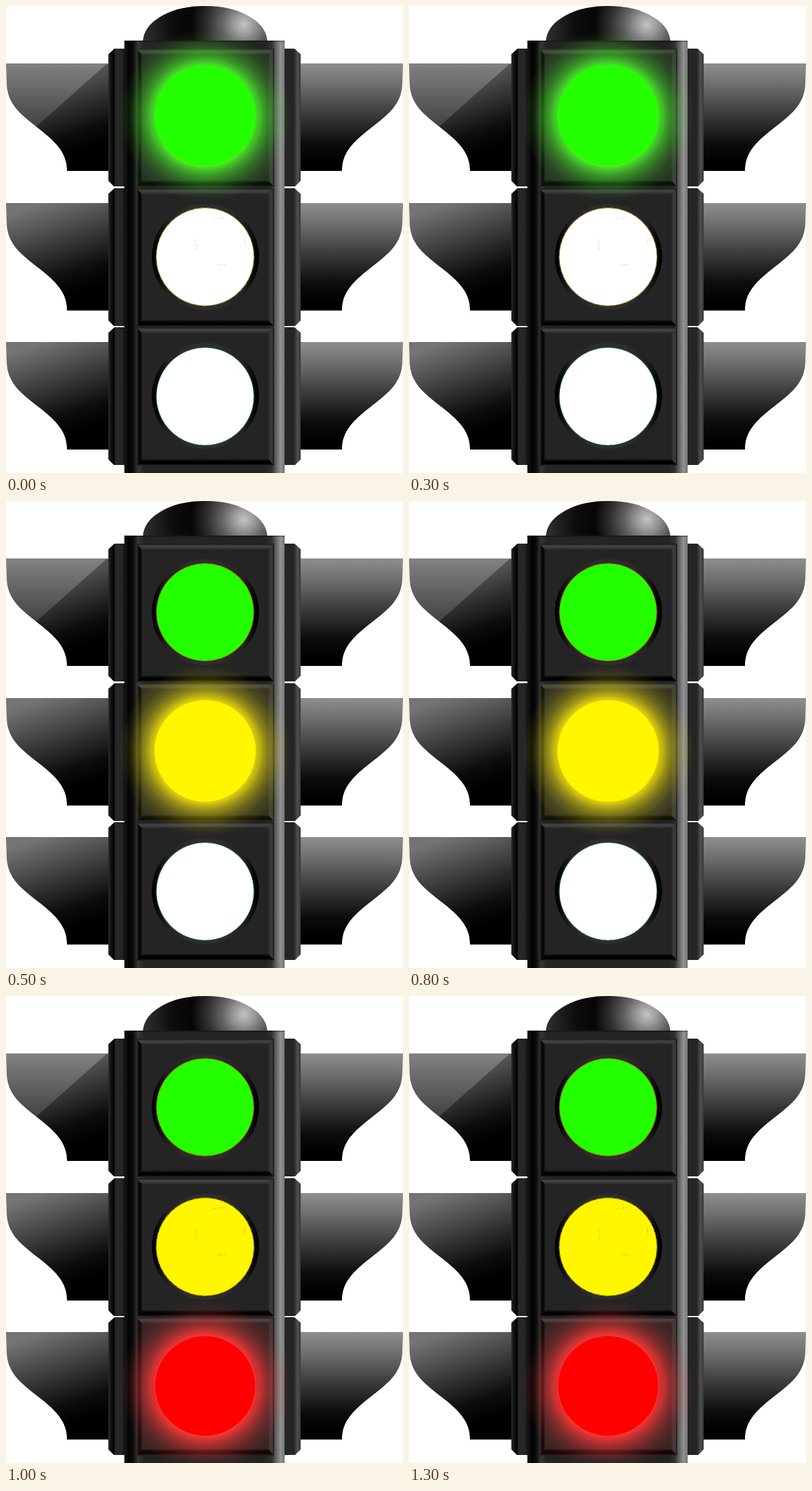
Recreate the animation shown at these times as an HTML page. Size 644 px wide and 756 px high, loop 1500 ms.

```html
<!DOCTYPE html>
<html lang="en">
<head>
<meta charset="utf-8">
<title>Traffic light</title>
<style>
  html, body { margin: 0; width: 100%; height: 100%; overflow: hidden; background: #fff; }
  svg { display: block; }
</style>
</head>
<body>
<svg id="stage" width="644" height="756" viewBox="0 0 644 756"></svg>
<script>
const NS = 'http://www.w3.org/2000/svg';
const LOOP = 1500;
const stage = document.getElementById('stage');

function el(parent, tag, attrs) {
  const node = document.createElementNS(NS, tag);
  for (const key in attrs) node.setAttribute(key, attrs[key]);
  parent.appendChild(node);
  return node;
}

const defs = el(stage, 'defs', {});

// stops: [offset, colour, opacity]
function gradient(id, kind, attrs, stops) {
  const g = el(defs, kind + 'Gradient', { id, gradientUnits: 'userSpaceOnUse', ...attrs });
  for (const [offset, color, opacity = 1] of stops)
    el(g, 'stop', { offset, 'stop-color': color, 'stop-opacity': opacity });
}
const across = (id, x1, x2, stops) => gradient(id, 'linear', { x1, x2, y1: 0, y2: 0 }, stops);
const down = (id, y1, y2, stops) => gradient(id, 'linear', { x1: 0, x2: 0, y1, y2 }, stops);
const path = (parent, d, fill, more) => el(parent, 'path', { d, fill, ...more });

gradient('dome', 'radial', { cx: 386, cy: 30, r: 165 }, [
  [0, '#c4c4c4'], [.1, '#9a9a9a'], [.22, '#626262'], [.36, '#303030'], [.52, '#060606'],
  [.7, '#0c0c0c'], [1, '#303030']]);
across('body', 192, 452, [
  [0, '#181818'], [.03, '#020202'], [.055, '#0c0c0c'], [.085, '#383838'], [.12, '#242424'],
  [.88, '#242424'], [.92, '#303030'], [.945, '#606060'], [.975, '#929292'], [1, '#757575']]);
across('plateL', 166, 192, [
  [0, '#2c2c2c'], [.18, '#101010'], [.36, '#000'], [.44, '#272727'], [.85, '#262626'], [1, '#111']]);
across('plateR', 452, 478, [
  [0, '#1c1c1c'], [.1, '#262626'], [.55, '#242424'], [.64, '#303030'], [.8, '#505050'], [1, '#383838']]);
gradient('hoodL', 'linear', { x1: 60, y1: 93, x2: 110, y2: 240 }, [
  [0, '#747474'], [.25, '#545454'], [.55, '#2c2c2c'], [.8, '#0c0c0c'], [1, '#000']]);
down('hoodR', 93, 255, [
  [0, '#8e8e8e'], [.2, '#707070'], [.5, '#3c3c3c'], [.8, '#0c0c0c'], [1, '#000']]);
down('lit', 93, 193, [[0, '#828282'], [1, '#444']]);
down('edgeT', 69, 79, [[0, '#181818'], [.4, '#444'], [.7, '#3a3a3a'], [1, '#242424']]);
down('edgeB', 282, 293, [[0, '#202020'], [.35, '#030303'], [.7, '#000'], [1, '#262626']]);
across('edgeL', 211, 221, [[0, '#343434'], [.45, '#090909'], [.75, '#050505'], [1, '#242424']]);
across('edgeR', 425, 435, [[0, '#242424'], [.4, '#3c3c3c'], [.7, '#363636'], [1, '#181818']]);
across('rim', 236, 411, [
  [0, '#000'], [.05, '#080808'], [.15, '#222'], [.35, '#2d2d2d'],
  [.65, '#2d2d2d'], [.85, '#222'], [.95, '#080808'], [1, '#000']]);

path(stage, 'M222 57C223 43 231 29 248 19C269 5 295 0 323 0S377 5 398 19C415 29 423 43 424 57Z', 'url(#dome)');
path(stage, 'M192 56H452V756H192Z', 'url(#body)');
path(stage, 'M192 56H452V58H192Z', '#000', { opacity: .3 });

const HOOD = 'M0 93H166V267H99C99 238 82 221 54 199S1 160 1 123Z';
const CREASE = 'M163 94L49 195L54 199C82 221 99 238 99 267H166V94Z';

// One section of the housing: hoods, side plates, bevelled panel and lens rim.
function section(dy, creased) {
  const g = el(stage, 'g', { transform: `translate(0 ${dy})` });
  path(g, HOOD, creased ? 'url(#lit)' : 'url(#hoodL)');
  if (creased) path(g, CREASE, 'url(#hoodL)');
  path(g, HOOD, 'url(#hoodR)', { transform: 'translate(644 0) scale(-1 1)' });
  path(g, 'M192 69H176L166 78V283L175 292H192Z', 'url(#plateL)');
  path(g, 'M452 69H468L478 78V283L469 292H452Z', 'url(#plateR)');
  path(g, 'M212 69H434V293H212Z', '#242424');
  path(g, 'M211 69H435L425 79H221Z', 'url(#edgeT)');
  path(g, 'M211 69L221 79V282L211 293Z', 'url(#edgeL)');
  path(g, 'M435 69L425 79V282L435 293Z', 'url(#edgeR)');
  path(g, 'M211 293L221 282H425L435 293Z', 'url(#edgeB)');
  el(g, 'ellipse', { cx: 323.5, cy: 180, rx: 87, ry: 86, fill: 'url(#rim)' });
}
section(0, true);
section(226, false);
section(451, false);

const disc = (parent, cy, r, fill, more) => el(parent, 'circle', { cx: 323, cy, r, fill, ...more });

function lens(cy, fill, line, dash) {
  const g = el(stage, 'g', {});
  disc(g, cy, 79, fill);
  disc(g, cy, 79.3, 'none', { stroke: line, 'stroke-width': 1.2, 'stroke-dasharray': dash });
  return g;
}

function flecks(parent, color) {
  path(parent, 'M337 345l5-2M346 343h9M307 382l2-6M309 386v10M387 374v12M344 419h13',
    'none', { stroke: color, 'stroke-width': 1, 'stroke-dasharray': '3 2' });
}

// A lit lamp: a tint over its panel, a soft halo and the bright disc.
function glow(id, cy, r, color, halo, line, top) {
  const reach = 140, at = radius => radius / reach;
  gradient(id, 'radial', { cx: 323, cy, r: reach }, [
    [at(r), halo, .92], [at(88), halo, .76], [at(97), halo, .52],
    [at(109), halo, .29], [at(123), halo, .11], [1, halo, 0]]);
  const g = el(stage, 'g', {});
  path(g, `M212 ${top}H434V${top + 223}H212Z`, halo, { opacity: .08 });
  disc(g, cy, reach, `url(#${id})`);
  disc(g, cy, r, color);
  path(g, `M${323 - r * .8} ${cy + r * .6}A${r} ${r} 0 0 0 ${323 + r * .8} ${cy + r * .6}`,
    'none', { stroke: line, 'stroke-width': 1, opacity: .7 });
  return g;
}

const GREEN = '#24ff00', YELLOW = '#fff600', RED = '#f00';

lens(180, GREEN, '#b02010', '7 2');
const blank = lens(406, '#fff', '#a88a18', '9 2');
flecks(blank, '#d8d4a0');
const amber = lens(406, YELLOW, '#a89400', '9 2');
flecks(amber, '#c0b800');
lens(632, '#fff', '#15703c', '7 2');

// Each part with its visibility in the three steps of the loop.
const steps = [
  [glow('haloG', 178, 82, GREEN, '#4cf02c', '#b4d800', 69), [1, 0, 0]],
  [blank, [1, 0, 0]],
  [glow('haloY', 404.5, 82, YELLOW, '#f0e010', '#fff600', 295), [0, 1, 0]],
  [amber, [0, 0, 1]],
  [glow('haloR', 631.5, 81, RED, '#ff3838', '#ff5a00', 520), [0, 0, 1]],
];
for (const [node, shown] of steps) {
  const frames = [...shown, shown[2]].map((opacity, i) =>
    ({ opacity, offset: i / 3, easing: 'steps(1, end)' }));
  node.animate(frames, { duration: LOOP, iterations: Infinity }).startTime = 0;
}
</script>
</body>
</html>
```
